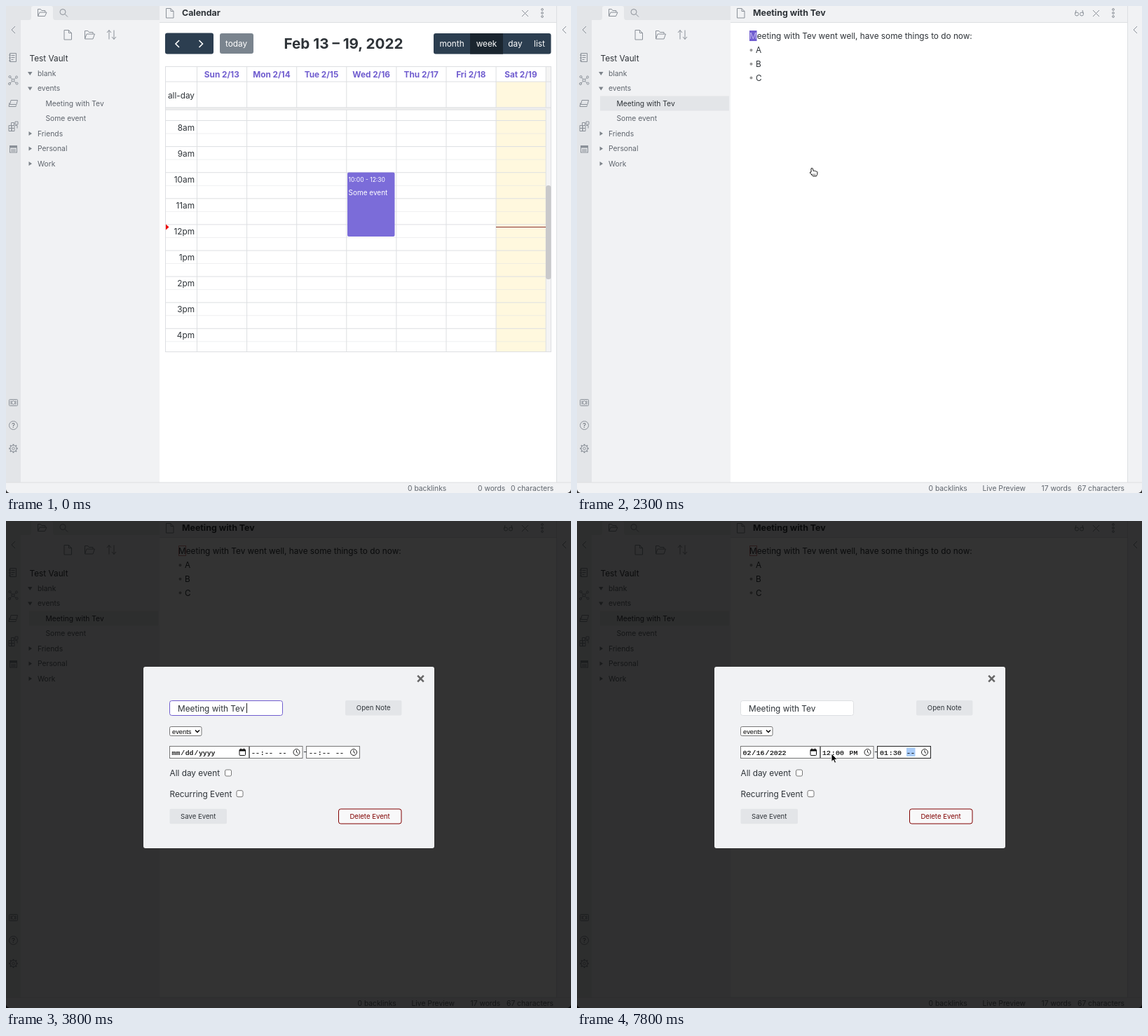
Recreate the animation shown at these times as an HTML page. Size 806 by 695 pixels, loop 8000 ms.

```html
<!DOCTYPE html>
<html lang="en">
<head>
<meta charset="utf-8">
<title>Calendar</title>
<style>
  html, body { margin: 0; height: 100%; overflow: hidden; background: #fff; }
  svg { display: block; font: 11.8px Inter, sans-serif; }
  text { fill: #2e3338; white-space: pre; }
  .mid { text-anchor: middle; }
  .end { text-anchor: end; }
  .bold { font-weight: 700; }
  .small { font-size: 10.3px; }
  .tiny { font-size: 9.6px; }
  .event { font-size: 10px; }
  .hours { font-size: 8.5px; }
  .head { font-size: 12.4px; font-weight: 700; }
  .range { font-size: 20.66px; font-weight: 700; }
  .tip { font-size: 10.6px; }
  .mute { fill: #5f656d; }
  .white { fill: #fff; }
  .purple { fill: #705dcf; }
  .red { fill: #800000; }
  .black { fill: #000; }
  .select { font: 9.3px "Liberation Sans", sans-serif; fill: #000; }
  .mono { font: 9.84px "Liberation Mono", monospace; fill: #000; stroke: #000; stroke-width: .2; }
  .hint { font: bold 9.84px "Liberation Mono", monospace; fill: #222; }
  .day { font-size: 8px; }
  .gray { fill: #9a9a9a; }
  .link { fill: #1a73e8; }
</style>
</head>
<body>
<svg id="stage" width="806" height="695" viewBox="0 0 806 695"></svg>
<script>
const LOOP = 8000, STEP = 100;
const PURPLE = '#705dcf', LINE = '#dddfe2', PANEL = '#f1f2f4', SHADE = '#e3e5e8', ICON = '#8a9098';
const NOTE = 'Meeting with Tev';

const text = (x, y, s, cls = '') => `<text x="${x}" y="${y}" class="${cls}">${s}</text>`;
const rect = (x, y, w, h, fill, more = '') =>
  `<rect x="${x}" y="${y}" width="${w}" height="${h}" fill="${fill}" ${more}/>`;
const box = (x, y, w, h, fill, stroke, r = 0) => rect(x, y, w, h, fill, `stroke="${stroke}" rx="${r}"`);
const path = (d, stroke = ICON, more = '') => `<path d="${d}" fill="none" stroke="${stroke}" ${more}/>`;
const fill = (d, color) => `<path d="${d}" fill="${color}"/>`;
const ring = (x, y, r, stroke = ICON) => `<circle cx="${x}" cy="${y}" r="${r}" fill="none" stroke="${stroke}"/>`;
const range = (n, fn) => Array.from({ length: n }, (_, i) => fn(i)).join('');
const cross = (x, y, r, color, w) =>
  path(`M${x - r} ${y - r}l${2 * r} ${2 * r}m0 ${-2 * r}l${-2 * r} ${2 * r}`, color, `stroke-width="${w}"`);

const page = (x, y) => path(`M${x} ${y}h6.5l4 4v9.5h-10.5zm6.5 0v4h4`);
const folder = (x, y, w, h) =>
  path(`M${x} ${y + h}v${-h}h${w * .35}l1.5 2h${w * .45}v2.5m${-w * .8 - 1.5} ${h - 4.5}l2.5 ${4.5 - h}h${w - 1}l-2.5 ${h - 4.5}z`);

function ribbon() {
  const gear = range(8, i => {
    const a = i * Math.PI / 4, c = Math.cos(a), s = Math.sin(a);
    return path(`M${10.5 + 4.5 * c} ${631.5 + 4.5 * s}l${1.8 * c} ${1.8 * s}`, ICON, 'stroke-width="2"');
  });
  return rect(0, 0, 21, 680, SHADE) + path('M13 29l-5 5 5 5') +
    path('M5.500 67.500h9v12h-9zm2 3h5m-5 3h5m-5 3h3M4 70h3m-3 4h3m-3 4h3') +
    ring(10, 106, 2) + ring(5.5, 101, 1.5) + ring(15, 101.500, 1.5) + ring(5, 111, 1.5) + ring(15.500, 110.500, 1.5) +
    path('M6.500 102l2 2.500m5.300-1.800l-2.300 2M6 110l2.500-2.500m5.500 2.200l-2.200-2') +
    path('M7 134.500h9.500l-1.500 6h-9.500zM5 138l-1 5.500h10l.5-2') +
    path('M4 170.500h4v4h-4zm4 0h4v4h-4zm-4 4h4v4h-4zm4 0h4v4h-4zM7.500 166.500h4v4h-4zM13 165h4v4h-4zm0 5.500h3v4') +
    rect(5, 199, 11, 3.5, ICON) + box(5.500, 199.500, 10, 9.500, 'none', ICON) + path('M7 205h7m-7 2h7') +
    box(4.500, 561.500, 12, 9, 'none', ICON, 1) + ring(10.5, 566, 2.5) + path('M7 563v6m7-6v6') +
    ring(10.5, 598.500, 6) + text(10.5, 602, '?', 'mid tiny mute') +
    ring(10.5, 631.500, 4.5) + ring(10.5, 631.500, 1.8) + gear;
}

function sidebar(selected, hovered) {
  const items = [['blank', 'v'], ['events', 'v'], [NOTE], ['Some event'], ['Friends', '>'], ['Personal', '>'], ['Work', '>']];
  return rect(21, 0, 198, 680, PANEL) + rect(21, 0, 198, 20, SHADE) +
    fill('M33 20q3 0 3-4V3q0-3 3-3h25q3 0 3 3v13q0 4 3 4z', PANEL) +
    folder(45.500, 4.500, 11, 10) + ring(81, 8.500, 4) + path('M84 11.500l4 4') +
    page(83, 34.500) + folder(112.500, 35.500, 12.500, 11.500) +
    path('M147 47.500v-13m-3 3.500l3-3.500 3 3.500M154 34.500v13m-3-3.500l3 3.500 3-3.500') +
    text(33.5, 78.500, 'Test Vault') +
    items.map(([name, mark], i) => {
      const y = 96 + i * 21.5, on = name === selected || name === hovered;
      const arrow = mark === 'v' ? `M31 ${y - 2}h6.500l-3.250 5z` : `M32.500 ${y - 3}v6l4.500-3z`;
      return (on ? rect(33, y - 10.500, 184, 21, SHADE) : '') + (mark ? fill(arrow, '#7d838a') : '') +
        text(mark ? 45 : 56.5, y + 3.7, name, on ? 'small' : 'small mute');
    }).join('');
}

function frame(title, status) {
  return rect(219, 0, 566, 680, '#fff') + rect(219, 0, 566, 23, PANEL) + rect(219, 23, 566, 1, LINE) +
    page(228.500, 3.500) + text(251, 14, title, 'head') + cross(740.5, 10.5, 4.5, ICON, 1) +
    ring(765, 5, 1.4) + ring(765, 10, 1.4) + ring(765, 15, 1.4) +
    rect(785, 0, 21, 680, PANEL) + rect(785, 0, 1, 680, LINE) + path('M799 29l-5 5 5 5') +
    rect(0, 680, 806, 15, PANEL) + rect(0, 679.500, 806, 1, LINE) +
    status.map(([x, s]) => text(x, 692, s, 'small mute')).join('') +
    fill('M0 690v5h5q-4-1-5-5zM806 690v5h-5q4-1 5-5z', '#333');
}

function calendar() {
  const col = i => 272.5 + 71.1 * i, hour = i => 163.5 + 37.1 * i;
  const days = ['Sun', 'Mon', 'Tue', 'Wed', 'Thu', 'Fri', 'Sat'];
  const labels = ['8am', '9am', '10am', '11am', '12pm', '1pm', '2pm', '3pm', '4pm'];
  return frame('Calendar', [[573, '0 backlinks'], [673, '0 words'], [720, '0 characters']]) +
    rect(227, 38.500, 69, 30, '#2c3e50', 'rx="3"') + path('M247 49l-5 5 5 5M275.500 49l5 5-5 5', '#fff', 'stroke-width="1.6"') +
    rect(305, 39, 48, 29, '#7a848e', 'rx="3"') + text(328.5, 58, 'today', 'mid white') +
    text(481.5, 61, 'Feb 13 – 19, 2022', 'mid range') +
    rect(610, 39, 167.500, 29.500, '#2c3e50', 'rx="3"') + rect(662, 39, 47, 29.500, '#1a252f') +
    [[636, 'month'], [685.5, 'week'], [726.5, 'day'], [761, 'list']].map(([x, s]) => text(x, 58, s, 'mid white')).join('') +
    rect(699, 108, 71, 386, '#fff8de') + rect(770, 86, 8, 408, '#f4f4f4') +
    range(18, i => path(`M227.500 ${hour(i / 2)}H770`, LINE, i % 2 ? 'stroke-dasharray="1 1"' : '')) +
    rect(227, 144.500, 551, 4, '#f0f0f0') + path('M227.500 108H778M227.500 145H778M227.500 148H770', LINE) +
    range(8, i => path(`M${col(i)} 86.500V145M${col(i)} 148V493.500`, LINE)) +
    box(227.500, 86.500, 550, 407, 'none', LINE) +
    days.map((d, i) => text(col(i) + 35.3, 101.500, `${d} 2/${13 + i}`, 'mid bold purple')).join('') +
    text(269, 131.500, 'all-day', 'end') +
    labels.map((s, i) => text(269, hour(i) + 14, s, 'end')).join('') +
    rect(487, 237.500, 67.500, 91.500, '#7b6cd9', 'rx="2"') +
    text(488.5, 250.500, '10:00 - 12:30', 'hours white') + text(488.5, 270, 'Some event', 'event white') +
    rect(699, 315, 71, 1, '#8a3030') + fill('M228 311.500v8l4.500-4z', '#e00') +
    rect(770, 256, 7.5, 134, '#c9c9cb', 'rx="3.500"');
}

function note(block) {
  const M = block === 'solid' ? '<tspan fill="#bdb3ee">M</tspan>' : 'M';
  return frame(NOTE, [[501.5, '0 backlinks'], [578.5, 'Live Preview'], [662.5, '17 words'], [714, '67 characters']]) +
    ring(713, 11.500, 2.5) + ring(720, 11.500, 2.5) + path('M710.500 11l1.500-5m10.500 5l-1.500-5') +
    (block === 'solid' ? rect(246, 35, 10.500, 15, PURPLE) : '') +
    (block === 'outline' ? box(246.500, 35.500, 10, 14, 'none', '#d08a8a') : '') +
    text(246, 47, M + NOTE.slice(1) + ' went well, have some things to do now:') +
    ['A', 'B', 'C'].map((s, i) => {
      const y = 63 + i * 19.8;
      return `<circle cx="248.500" cy="${y}" r="2" fill="#999"/>` + text(255, y + 4, s);
    }).join('');
}

function tooltip(y) {
  return `<g opacity=".94">${rect(230.500, y - 19.500, 199, 39, '#111', 'rx="4"')}${fill(`M231 ${y - 4}l-4 4 4 4z`, '#111')}</g>` +
    text(330, y - 3.5, 'Last modified at 2022-02-18 22:13', 'mid tip white') +
    text(330, y + 12, 'Created at 2022-02-18 22:13', 'mid tip white');
}

const COMMANDS = ['Full Calendar: Upgrade note to event', 'Full Calendar: Open Calendar',
  'Open in default app: Show in system explorer', 'Quick switcher: Open quick switcher',
  'Outgoing links: Open pane', 'Full Calendar: New event', 'Outline: Show outline',
  'Open command palette', 'Graph view: Open local graph', 'Insert template', 'Save file'];

// Fuzzy match: bolds the first run of letters found in order, or returns null.
function match(name, query) {
  let k = 0;
  const out = [...name].map(c => c.toLowerCase() === query[k] ? (k++, `<tspan class="bold">${c}</tspan>`) : c).join('');
  return k === query.length ? out : null;
}

function palette(query, caret) {
  const found = COMMANDS.map(c => match(c, query)).filter(Boolean);
  const bottom = 118.2 + 25.2 * found.length, y = bottom - 15;
  const caretX = 167 + [0, 7.2, 14.4, 19, 25.6][query.length];
  return rect(144, 39, 519, bottom - 39, '#fff', 'rx="4"') + box(151.500, 46.500, 504, 29, '#fff', PURPLE, 4) +
    (query ? text(167, 66, query) : text(167, 66, 'Select a command...', 'gray')) +
    (caret ? rect(caretX, 54.500, 1, 15, '#222') : '') + rect(151, 83.500, 505, 25, PANEL) +
    found.map((s, i) => {
      const mid = 96 + i * 25.2;
      const key = s.replace(/<[^>]*>/g, '').startsWith('Quick');
      return text(176.5, mid + 4, s) +
        (key ? rect(615, mid - 9, 33, 17.500, PANEL, 'rx="3"') + text(631.5, mid + 3.5, '⌘ O', 'mid tiny') : '');
    }).join('') +
    path(`M298 ${y}v-7m-3 3l3-3 3 3M306 ${y - 7}v7m-3-3l3 3 3-3`, '#555', 'stroke-width="1.5"') +
    path(`M387 ${y - 7}v4h-6.500m2.500-2.500l-2.500 2.500 2.500 2.500`, '#555', 'stroke-width="1.200"') +
    text(313, y, 'to navigate', 'tiny mute') + text(391, y, 'to use', 'tiny mute') +
    text(434, y, 'esc', 'tiny bold mute') + text(453, y, 'to dismiss', 'tiny mute');
}

const FIELDS = [[350, '12', 6300], [369, '00', 6500], [388.5, 'PM', 6800], [432, '01', 7400], [451, '30', 7800], [470, 'PM', LOOP]];
const FOCUS = [5800, 6300, 6500, 7000, 7600, 7800];

function dialog(t) {
  const named = t < 4500, dated = t >= 5000;
  const active = FOCUS.filter(f => t >= f).length - 1;
  const mark = x => rect(x, 323.500, 12.500, 12.500, '#aaccf8');
  const border = on => on ? '#222' : '#767676';
  const clock = x => ring(x, 330, 4.5, '#222') + path(`M${x} 327v3l2 1.500`, '#222');
  const button = (x, y, w, s) => rect(x, y, w, 21.500, SHADE, 'rx="2"') + text(x + w / 2, y + 14.200, s, 'mid tiny');
  return rect(196, 208, 415, 259, PANEL, 'rx="3"') + cross(591.5, 225, 4.3, '#666', 2.5) +
    box(233.500, 256.500, 161, 21, '#fff', named ? PURPLE : LINE, 3) + text(245, 271.500, NOTE) +
    (named ? rect(343, 260, 1, 14, '#222') : '') +
    button(484, 256, 80.5, 'Open Note') + button(233.5, 410.8, 81.5, 'Save Event') +
    box(474.500, 411, 89.500, 21, '#f8f8f9', '#800000', 3) + text(519, 425, 'Delete Event', 'mid tiny red') +
    box(233.500, 293.500, 45.500, 13, '#fff', '#767676', 2) + text(237, 303.500, 'events', 'select') +
    path('M270 298.500l3 3 3-3', '#000', 'stroke-width="1.500"') +
    box(233.500, 321.500, 113, 17, '#fff', border(t >= 4500 && active < 0)) +
    box(347.500, 321.500, 75.500, 17, '#fff', border(active >= 0 && active < 3)) +
    box(428.500, 321.500, 76, 17, '#fff', border(active >= 3)) + text(424, 333, '-') +
    (t >= 4500 && active < 0 ? mark(236) : '') +
    (dated ? ['02', '16', '2022'] : ['mm', 'dd', 'yyyy']).map((s, i) =>
      text(236.5 + i * 19.2, 333.500, s + (i < 2 ? '<tspan dx="1">/</tspan>' : ''), dated ? 'mono' : 'hint')).join('') +
    box(333, 326, 8.500, 8.500, 'none', '#111', 1) + rect(333, 326, 8.500, 2.500, '#111') + path('M335 324.500v2m4.500-2v2', '#111') +
    FIELDS.map(([x, s, when], i) => (i === active ? mark(x) : '') + text(x, 333.500, t >= when ? s : '--', 'mono')).join('') +
    text(362.7, 333.500, ':', 'mono') + text(444.7, 333.500, ':', 'mono') + clock(414.5) + clock(496) +
    text(233.5, 364, 'All day event') + box(312.500, 355, 9, 9, '#fff', '#767676', 2) +
    text(233.5, 393.800, 'Recurring Event') + box(329, 384.700, 9, 9, '#fff', '#767676', 2);
}

function picker(chosen) {
  const at = i => [248 + 22 * (i % 7), 397 + 20 * Math.floor(i / 7)];
  return rect(231, 341, 166, 206, '#000', 'opacity=".15" rx="4"') + box(233.500, 340.500, 161, 203, '#fff', '#ccc', 2) +
    text(241, 360, 'February 2022', 'day bold') + fill('M302 355.500h5l-2.500 3.500z', '#333') +
    path('M369 360v-7m-3 3l3-3 3 3M384 353v7m-3-3l3 3 3-3', '#333') +
    [...'SMTWTFS'].map((s, i) => text(248 + 22 * i, 379, s, 'mid day')).join('') +
    range(42, i => {
      const [x, y] = at(i), date = new Date(2022, 0, 30 + i), day = date.getDate();
      const inside = date.getMonth() === 1, on = inside && day === 16 && chosen;
      return (on ? rect(x - 9, y - 12, 18, 18, '#1a73e8', 'rx="2"') : '') +
        (inside && day === 19 ? box(x - 9, y - 12, 18, 18, 'none', '#888', 2) : '') +
        text(x, y, day, 'mid day ' + (on ? 'white' : inside ? '' : 'gray'));
    }) + text(241, 533, 'Clear', 'day link') + text(387, 533, 'Today', 'day link end');
}

const POINTER = [[100, 758, 674], [300, 640, 420], [500, 420, 130], [700, 190, 55], [900, 159, 155], [1100, 160, 141],
  [1600, 160, 141], [1800, 337, 237], [4000, 337, 237], [4500, 337, 330], [4800, 337, 330], [5000, 314, 438],
  [5300, 314, 438], [5700, 363, 332], [LOOP, 363, 332]];

function pointer(t) {
  if (t < 100 || (t >= 2500 && t < 4000)) return '';
  const i = POINTER.findIndex(p => p[0] > t);
  const [t0, x0, y0] = POINTER[i - 1], [t1, x1, y1] = POINTER[i];
  const u = (t - t0) / (t1 - t0);
  const shape = t >= 700 && t < 2500
    ? '<path d="M-3-5q1.200-1.500 2.300 0l1 3.500q1.500-1 2.200.2 1.500-.6 2 .5 1.500-.2 1.500 1.600 0 2.500-1.500 5h-5l-4-4.500q-.8-1.700 1.500-1.200z" fill="#fff" stroke="#111"/><path d="M.500 2.500v2m2-2v2m-4-2v2" stroke="#111" stroke-width=".7"/>'
    : '<path d="M0 0v11.500l2.700-2.500 1.900 4.300 2-.9-1.900-4.100h3.600z" fill="#000" stroke="#fff" stroke-width=".9"/>';
  return `<g transform="translate(${x0 + (x1 - x0) * u} ${y0 + (y1 - y0) * u})">${shape}</g>`;
}

function scene(t) {
  const opened = t >= 1500, dimmed = t >= 2400;
  const hovered = t >= 1000 ? (opened ? '' : NOTE) : t >= 800 ? 'Some event' : '';
  const query = 'upra'.slice(0, [2700, 2900, 3000, 3200].filter(k => t >= k).length);
  const block = dimmed ? 'outline' : t >= 2100 || t < 1800 ? 'solid' : '';
  let out = ribbon() + sidebar(opened ? NOTE : '', hovered) + (opened ? note(block) : calendar());
  if (t >= 800 && t < 1000) out += tooltip(160);
  if (t >= 1100 && t < 1500) out += tooltip(138.5);
  if (dimmed) out += rect(0, 0, 806, 695, '#000', 'opacity=".8"');
  if (dimmed && t < 3800) out += palette(query, t < 3600);
  if (t >= 3800) out += dialog(t);
  if (t >= 4800 && t < 5300) out += picker(t >= 5000);
  return out + pointer(t);
}

const stage = document.getElementById('stage');
let shown = -1;
function tick() {
  const t = Math.floor(performance.now() % LOOP / STEP) * STEP;
  if (t !== shown) stage.innerHTML = scene(shown = t);
  requestAnimationFrame(tick);
}
tick();
</script>
</body>
</html>
```
